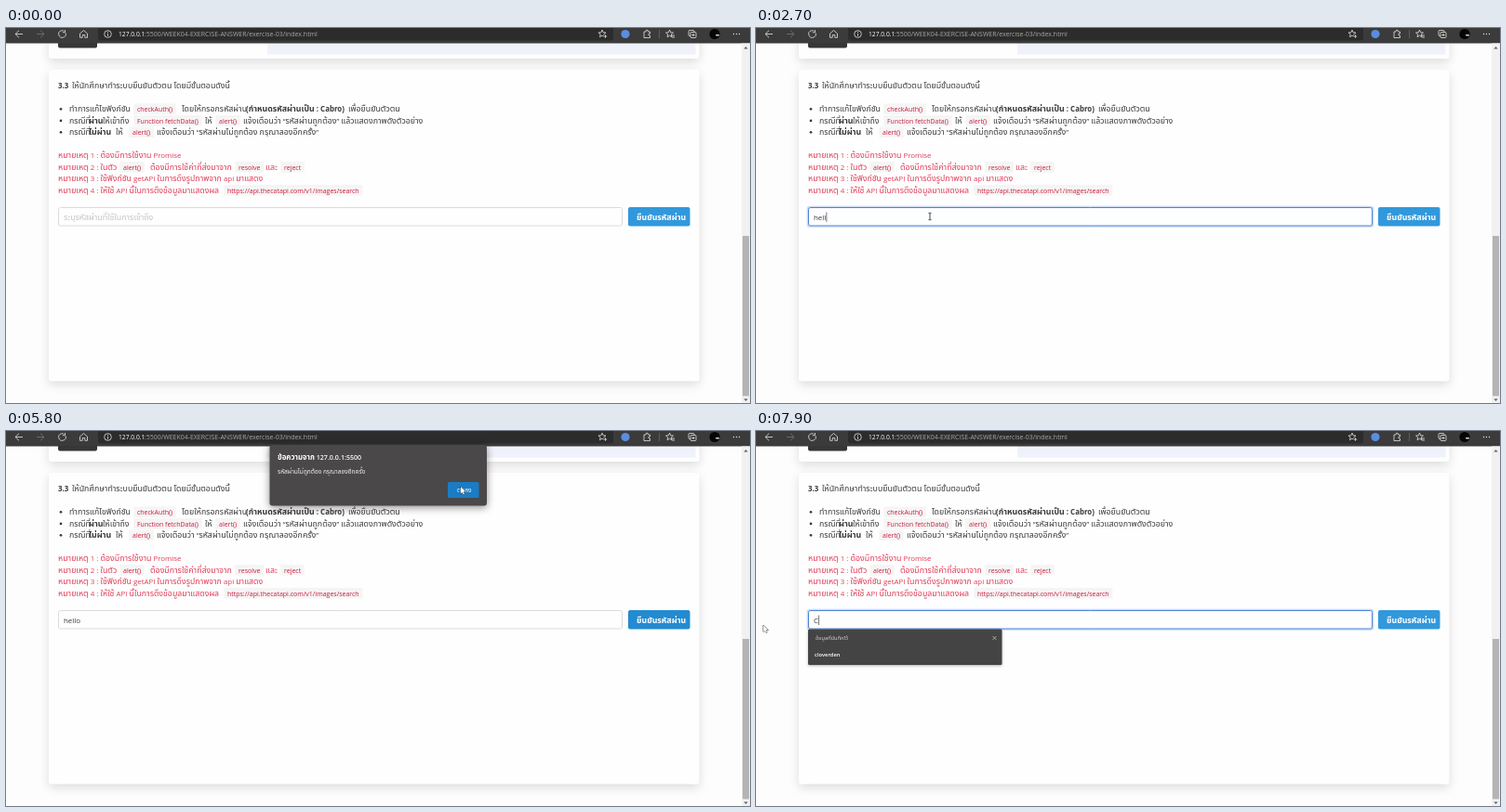
An HTML page with a canvas that plays this animation: 800 px wide and 404 px high, repeating every 8 s.

```html
<!DOCTYPE html>
<html lang="th">
<head>
<meta charset="utf-8">
<title>Password check</title>
<style>
  html, body { margin: 0; width: 100%; height: 100%; overflow: hidden; background: #fefdfe; }
  canvas { display: block; width: 800px; height: 404px; }
</style>
</head>
<body>
<canvas id="stage"></canvas>
<script>
const W = 800, H = 404, LOOP = 8000, STEP = 100, BLINK = 400;
const FACE = '"Open Sans", "Noto Sans Thai Looped", "Noto Sans Thai", "Noto Sans", sans-serif';
const INK = '#3a3a3a', NOTE = '#e03c58', CODE = '#cc1a3c', BLUE = '#3298dc', PALE = '#e4e4e4';
const FIELD = [56, 193, 607, 20.5], SUBMIT = [669, 193, 66.5, 20.5], OK = [475, 55, 33.5, 17];

const canvas = document.getElementById('stage');
const c = canvas.getContext('2d');
const dpr = window.devicePixelRatio || 1;
canvas.width = W * dpr;
canvas.height = H * dpr;

// Body sizes; Thai follows the page's letter pitch in whichever face is present.
const LATIN = 7.9;
c.font = `100px ${FACE}`;
const THAI = Math.min(9.5, Math.max(7, 6600 / c.measureText('ทำการแก้ไขฟังก์ชัน').width));

function text(str, x, y, { color = INK, scale = 1, weight = 400 } = {}) {
  c.fillStyle = color;
  for (const run of str.match(/[\u0e00-\u0e7f]+|[^\u0e00-\u0e7f]+/g) || []) {
    const size = (/[\u0e00-\u0e7f]/.test(run) ? THAI : LATIN) * scale;
    c.font = `${weight} ${size}px ${FACE}`;
    c.fillText(run, x, y);
    x += c.measureText(run).width;
  }
  return x;
}

function box(x, y, w, h, r, fill) {
  c.beginPath();
  c.roundRect(x, y, w, h, r);
  if (fill) { c.fillStyle = fill; c.fill(); }
}

function disc(x, y, r, fill) {
  c.beginPath();
  c.arc(x, y, r, 0, 7);
  c.fillStyle = fill;
  c.fill();
}

function line(points, color = PALE, width = 0.8, close = false) {
  c.beginPath();
  points.forEach(([x, y]) => c.lineTo(x, y));
  if (close) c.closePath();
  c.strokeStyle = color;
  c.lineWidth = width;
  c.stroke();
}

function ring(x, y, r, from = 0, to = 2 * Math.PI) {
  c.beginPath();
  c.arc(x, y, r, from, to);
  c.strokeStyle = PALE;
  c.lineWidth = 0.8;
  c.stroke();
}

function shadowed(color, blur, dy, draw) {
  c.save();
  c.shadowColor = color;
  c.shadowBlur = blur * dpr;
  c.shadowOffsetY = dy * dpr;
  draw();
  c.restore();
}

function star(x, y, r) {
  const points = Array.from({ length: 10 }, (_, i) => {
    const a = i * Math.PI / 5 - Math.PI / 2, d = i % 2 ? r * 0.45 : r;
    return [x + d * Math.cos(a), y + d * Math.sin(a)];
  });
  line(points, PALE, 0.8, true);
}

function arrow(x, y, dir, color) {
  line([[x - 4 * dir, y], [x + 4 * dir, y]], color);
  line([[x, y - 3.8], [x + 4 * dir, y], [x, y + 3.8]], color);
}

function toolbar() {
  box(0, 0, W, 16.5, 0, '#3b3b3b');
  box(99, -6, 554, 19.5, 3, '#2c2c2c');
  arrow(14, 6.5, -1, PALE);
  arrow(37, 6.5, 1, '#777');
  ring(60.5, 6.5, 3.8, -0.3, 5.2);
  line([[63.5, 2], [63.5, 4.7], [60.8, 4.7]]);
  line([[79.5, 6], [83.5, 2.5], [87.5, 6], [87.5, 10.3], [84.8, 10.3], [84.8, 7.5], [82.2, 7.5], [82.2, 10.3], [79.5, 10.3]], PALE, 0.8, true);
  ring(109.5, 6.5, 3.8);
  line([[109.5, 5.8], [109.5, 8.8]]);
  disc(109.5, 4.4, 0.5, PALE);
  text('127.0.0.1', 121, 9.3, { color: '#fff', scale: 0.85 });
  text(':5500/WEEK04-EXERCISE-ANSWER/exercise-03/index.html', 148.8, 9.3, { color: '#a6a6a6', scale: 0.885 });

  star(641, 6.3, 4.2);
  disc(644.5, 9, 2.2, '#2c2c2c');
  line([[642.8, 9], [646.2, 9]]);
  line([[644.5, 7.3], [644.5, 10.7]]);
  disc(666, 6.5, 4.6, '#5a8de0');
  line([[686, 4], [688, 4], [688.5, 2.3], [690, 2.3], [690.5, 4], [692.5, 4], [692.5, 6], [691, 6.3], [691, 7.8], [692.5, 8.2], [692.5, 10.5], [686, 10.5]], PALE, 0.8, true);
  line([[702.5, 2], [702.5, 11]], '#666');
  star(713.5, 6.3, 4.2);
  line([[715, 8], [719, 8]]);
  line([[716, 10], [719, 10]]);
  box(734, 2.5, 6, 6, 1);
  c.stroke();
  box(736, 4.5, 6, 6, 1, '#3b3b3b');
  c.stroke();
  line([[739, 6], [739, 9]]);
  line([[737.5, 7.5], [740.5, 7.5]]);
  disc(762, 6.5, 5.6, '#050505');
  box(763, 7, 4, 1.6, 0.8, '#ddd');
  [782.5, 785.5, 788.5].forEach(x => disc(x, 6.5, 0.7, PALE));
}

function scrollbar() {
  box(791, 16.5, 9, H - 16.5, 0, '#f1f1f1');
  box(792, 224, 7, 172.5, 0, '#b4b4b4');
  for (const [y, dir] of [[21.5, -1], [400.5, 1]]) {
    c.beginPath();
    c.moveTo(793.3, y - dir);
    c.lineTo(797.7, y - dir);
    c.lineTo(795.5, y + 1.5 * dir);
    c.fillStyle = '#606060';
    c.fill();
  }
}

function code(str, x, y) {
  const scale = 0.885;
  c.font = `400 ${LATIN * scale}px ${FACE}`;
  box(x - 3.7, y - 8.6, c.measureText(str).width + 7.4, 11.6, 0, '#f5f5f5');
  text(str, x, y, { color: CODE, scale });
}

// Each piece: x, text, and kind (b bold, c code).
const ROWS = [
  [65, [56, '3.3', 'b'], [71, 'ให้นักศึกษาทำระบบยืนยันตัวตน โดยมีขั้นตอนดังนี้']],
  [90, [68, 'ทำการแก้ไขฟังก์ชัน'], [141, 'checkAuth()', 'c'], [189, 'โดยให้กรอกรหัสผ่าน'],
    [258, '(กำหนดรหัสผ่านเป็น : Cabro)', 'b'], [368, 'เพื่อยืนยันตัวตน']],
  [102.6, [68, 'กรณีที่'], [89, 'ผ่าน', 'b'], [104, 'ให้เข้าถึง'], [141, 'Function fetchData()', 'c'],
    [214, 'ให้'], [229, 'alert()', 'c'], [255, 'แจ้งเตือนว่า “รหัสผ่านถูกต้อง” แล้วแสดงภาพดังตัวอย่าง']],
  [115, [68, 'กรณีที่'], [89, 'ไม่ผ่าน', 'b'], [118, 'ให้'], [136, 'alert()', 'c'],
    [162, 'แจ้งเตือนว่า “รหัสผ่านไม่ถูกต้อง กรุณาลองอีกครั้ง”']],
  [140, [56, 'หมายเหตุ 1 : ต้องมีการใช้งาน Promise']],
  [152.6, [56, 'หมายเหตุ 2 : ในตัว'], [126, 'alert()', 'c'], [155, 'ต้องมีการใช้ค่าที่ส่งมาจาก'],
    [250, 'resolve', 'c'], [279, 'และ'], [299, 'reject', 'c']],
  [165, [56, 'หมายเหตุ 3 : ใช้ฟังก์ชัน getAPI ในการดึงรูปภาพจาก api มาแสดง']],
  [177.5, [56, 'หมายเหตุ 4 : ให้ใช้ API นี้ในการดึงข้อมูลมาแสดงผล'],
    [238, 'https://api.thecatapi.com/v1/images/search', 'c']]
];

function page() {
  box(0, 0, W, H, 0, '#fefdfe');
  shadowed('rgba(10,10,10,.13)', 11, 4, () => {
    box(46, -20, 699.5, 53, 3, '#fefefe');
    box(46, 45, 699.5, 335.5, 3, '#fefefe');
  });
  box(281, 10, 460.5, 18.5, 0, '#f0f2fb');
  box(56, 10, 42, 11.5, 2, '#363636');
  for (const [y, ...pieces] of ROWS) {
    const color = y > 130 ? NOTE : INK;
    if (y > 80 && y < 130) disc(59, y - 2.7, 1.35, INK);
    for (const [x, str, kind] of pieces) {
      if (kind === 'c') code(str, x, y);
      else text(str, x, y, { color, weight: kind === 'b' ? 700 : 400 });
    }
  }
}

const TYPED = [[0, ''], [1400, 'h'], [2500, 'he'], [2600, 'hel'], [2700, 'hell'], [2900, 'hello'], [7800, 'C']];
const FOCUS = [600, 6800];
const between = (t, a, b) => t >= a && t < b;
const inside = ([x, y], [bx, by, w, h]) => x >= bx && x <= bx + w && y >= by && y <= by + h;
const lastBefore = (list, t) => list.filter(([at]) => at <= t).pop();

// Pointer path: time, x, y.
const PATH = [[100, 330, -8], [500, 187, 203], [3700, 187, 203], [4400, 721, 188], [4700, 701, 205],
  [5000, 701, 205], [5600, 489, 60], [6100, 489, 60], [6700, 120, 212.8], [6800, 118, 212.8],
  [7000, 10, 213], [7100, 10, 213], [7200, 8, 209]];

function pointerAt(t) {
  const i = PATH.findIndex(p => p[0] > t);
  if (i === 0) return null;
  if (i < 0) return PATH[PATH.length - 1].slice(1);
  const [t0, x0, y0] = PATH[i - 1], [t1, x1, y1] = PATH[i];
  const k = (t - t0) / (t1 - t0), e = k * k * (3 - 2 * k);
  return [x0 + (x1 - x0) * e, y0 + (y1 - y0) * e];
}

function form(t, pointer, dialogOpen) {
  const focused = between(t, 600, 4900) || t >= 6800;
  const over = r => pointer && !dialogOpen && inside(pointer, r);
  const [x, y, w, h] = FIELD;
  if (focused) {
    box(x - 0.5, y - 0.5, w + 1, h + 1, 2.5);
    c.strokeStyle = 'rgba(50,115,220,.28)';
    c.lineWidth = 1.6;
    c.stroke();
  }
  box(x + 0.5, y + 0.5, w - 1, h - 1, 2, '#fefefe');
  c.strokeStyle = focused ? '#4c86d8' : over(FIELD) ? '#b5b5b5' : '#dbdbdb';
  c.lineWidth = 1;
  c.stroke();

  const [editedAt, value] = lastBefore(TYPED, t);
  const selected = between(t, 6900, 7800);
  let end = 62.5;
  if (!value) text('ระบุรหัสผ่านที่ใช้ในการเข้าถึง', 62, 207, { color: '#c4c4c4' });
  else {
    if (selected) {
      c.font = `${LATIN}px ${FACE}`;
      box(62, 198, c.measureText(value).width, 12, 0, '#0078d7');
    }
    end = text(value, 62, 207, { color: selected ? '#fff' : INK }) + 0.6;
  }
  const since = t - Math.max(editedAt, ...FOCUS.filter(f => f <= t));
  if (focused && !selected && Math.floor(since / BLINK) % 2 === 0) line([[end, 198.5], [end, 209]], '#444', 0.7);

  box(...SUBMIT, 2, dialogOpen ? '#238bd0' : over(SUBMIT) ? '#2793da' : BLUE);
  text('ยืนยันรหัสผ่าน', 678, 206.5, { color: '#fff', weight: 600 });
}

function suggestions(items) {
  const height = 21 + 17.5 * items.length;
  shadowed('rgba(0,0,0,.3)', 3, 1, () => box(56, 213.5, 208.5, height, 1.5, '#454445'));
  text('ข้อมูลที่บันทึกไว้', 64, 225, { color: '#cfcfcf', scale: 0.65 });
  line([[254.5, 221], [258.5, 225]], '#ccc', 0.7);
  line([[258.5, 221], [254.5, 225]], '#ccc', 0.7);
  items.forEach((item, i) => text(item, 63, 243.2 + 17.7 * i, { color: '#fff', scale: 0.74, weight: 600 }));
}

function dialog(pointer) {
  shadowed('rgba(0,0,0,.45)', 8, 2, () => box(283.5, 15, 233.5, 65.5, 3, '#4a4849'));
  text('ข้อความจาก 127.0.0.1:5500', 292, 30.7, { color: '#fff', scale: 0.9, weight: 600 });
  text('รหัสผ่านไม่ถูกต้อง กรุณาลองอีกครั้ง', 292, 45.5, { color: '#f0f0f0', scale: 0.75 });
  box(...OK, 1.5, pointer && inside(pointer, OK) ? '#1a7cc4' : '#1484d6');
  text('ตกลง', 485, 66, { color: '#fff', scale: 0.75 });
}

function drawPointer([x, y], t, dialogOpen) {
  const free = !dialogOpen;
  if (between(t, 6800, 7200) || free && inside([x, y], FIELD)) {
    line([[x, y - 3.5], [x, y + 3.5]], '#333', 0.9);
    for (const dy of [-3.7, 3.7]) line([[x - 1.6, y + dy], [x + 1.6, y + dy]], '#333', 0.8);
    return;
  }
  const hand = free && inside([x, y], SUBMIT);
  const shape = hand
    ? [[-0.8, 0], [0.8, 0], [0.8, 3], [4, 3.8], [4, 6.5], [3, 9], [-1, 9], [-3, 5.8], [-2, 5], [-0.8, 6]]
    : [[0, 0], [0, 7.4], [1.7, 5.9], [2.9, 8.4], [4, 7.9], [2.9, 5.5], [5.2, 5.3]];
  line(shape.map(([dx, dy]) => [x + dx, y + dy]), '#222', 0.9, true);
  c.fillStyle = '#fff';
  c.fill();
}

function draw(t) {
  c.setTransform(dpr, 0, 0, dpr, 0, 0);
  const pointer = pointerAt(t);
  const dialogOpen = between(t, 5000, 6100);
  page();
  toolbar();
  scrollbar();
  form(t, pointer, dialogOpen);
  if (between(t, 700, 1400)) suggestions(['cloverden', 'bitcoin']);
  if (t >= 7800) suggestions(['cloverden']);
  if (dialogOpen) dialog(pointer);
  if (pointer) drawPointer(pointer, t, dialogOpen);
}

const start = performance.now();
let shown = -1;
function tick() {
  const t = Math.floor((performance.now() - start) % LOOP / STEP) * STEP;
  if (t !== shown) draw(shown = t);
  requestAnimationFrame(tick);
}
tick();
</script>
</body>
</html>
```
